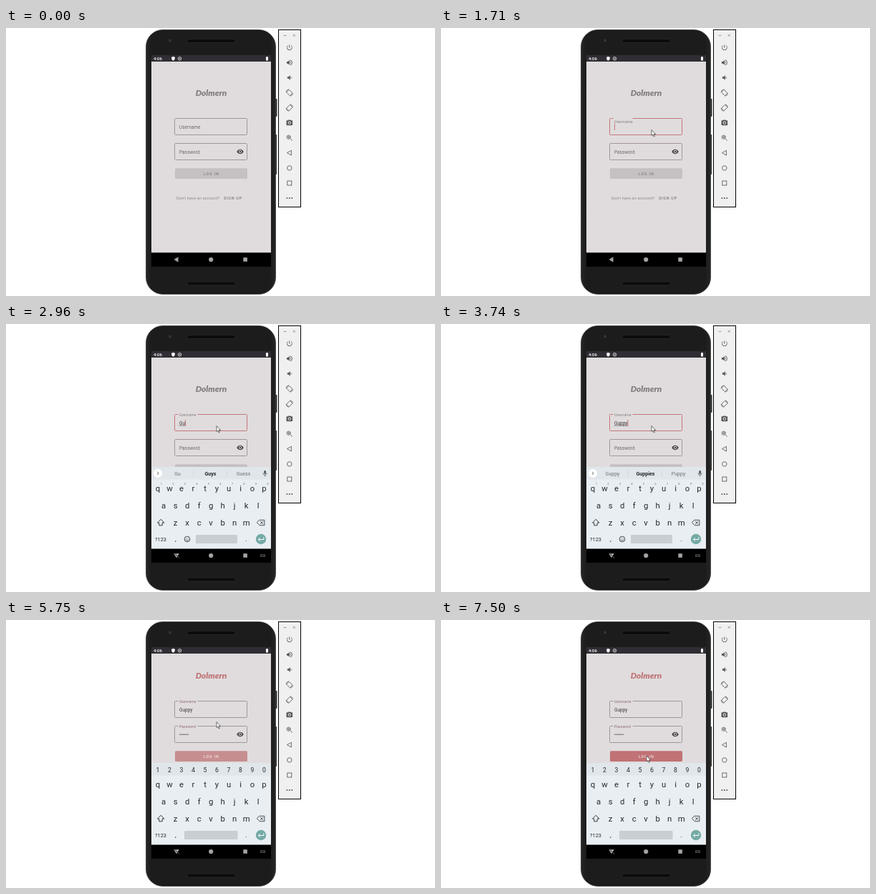
An HTML page that plays this animation: 599x375 px, repeating every 8 s.

```html
<!DOCTYPE html>
<html lang="en">
<head>
<meta charset="utf-8">
<title>Login screen</title>
<style>
html, body { margin: 0; width: 100%; height: 100%; overflow: hidden; background: #fff; }
svg { display: block; width: 100vw; height: 100vh; }
text { font-family: Roboto, sans-serif; white-space: pre; }
</style>
</head>
<body>
<svg id="stage" viewBox="0 0 599 375">
  <defs>
    <linearGradient id="body" x2="1" y2="0">
      <stop offset="0" stop-color="#262626"/><stop offset=".04" stop-color="#1c1c1c"/>
      <stop offset=".96" stop-color="#1c1c1c"/><stop offset="1" stop-color="#262626"/>
    </linearGradient>
  </defs>
</svg>
<script>
const NS = 'http://www.w3.org/2000/svg', LOOP = 8000;
const INK = '#1f2b2e', SOFT = '#566064', PINK = '#c4777b', GREY = '#857d80', BG = '#e0dcdd';
const stage = document.getElementById('stage');

function el(parent, tag, attrs, text) {
  const e = document.createElementNS(NS, tag);
  set(e, attrs);
  if (text !== undefined) e.textContent = text;
  return parent.appendChild(e);
}
function set(e, attrs) {
  for (const k in attrs) e.setAttribute(k, attrs[k]);
}
const clamp = (v, a, b) => Math.min(b, Math.max(a, v));
const show = (e, on) => e.setAttribute('display', on ? 'inline' : 'none');
const group = (p, attrs = {}) => el(p, 'g', attrs);
const rect = (p, x, y, width, height, fill, more = {}) =>
  el(p, 'rect', { x, y, width, height, fill, ...more });
const circle = (p, cx, cy, r, fill, more = {}) => el(p, 'circle', { cx, cy, r, fill, ...more });
const path = (p, d, fill, more = {}) => el(p, 'path', { d, fill, ...more });
const line = (p, d, color, w = 1) =>
  path(p, d, 'none', { stroke: color, 'stroke-width': w, 'stroke-linecap': 'round', 'stroke-linejoin': 'round' });
const label = (p, x, y, size, fill, text, more = {}) =>
  el(p, 'text', { x, y, 'font-size': size, fill, ...more }, text);
const mid = (p, x, y, size, fill, text, more = {}) =>
  label(p, x, y, size, fill, text, { 'text-anchor': 'middle', ...more });
// 24-unit icon grid centred on x, y
const icon = (p, x, y, s = .43) =>
  group(p, { transform: `translate(${x} ${y}) scale(${s}) translate(-12 -12)` });

// Phone shell
rect(stage, 376, 99, 2.5, 25, '#333', { rx: .8 });
rect(stage, 376, 149, 2, 56, '#333', { rx: .8 });
rect(stage, 195.5, 2.5, 181, 370, 'url(#body)', { rx: 23.5, stroke: '#3c3c3c', 'stroke-width': .8 });
circle(stage, 229, 17.5, 2, '#343434');
for (const y of [15.5, 355]) rect(stage, 253, y, 67, 5, '#0b0b0b', { rx: 2.5, stroke: '#303030', 'stroke-width': .6 });
rect(stage, 203, 38, 167, 296, BG);

// Login form
const form = group(stage);
const logo = mid(form, 286.5, 95, 11.8, GREY, 'Dolmern',
  { 'font-weight': 900, 'font-style': 'italic', style: 'font-family: Lato, sans-serif' });

function field(y, name) {
  const box = line(form, '', GREY);
  const tag = label(form, 242, 0, 6.3, GREY, name, { 'letter-spacing': .1 });
  const value = label(form, 242, y + 14.3, 6.5, '#3b3638', '');
  const under = line(form, '', '#3b3638', .6);
  const caret = rect(form, 0, y + 7.5, 1, 9, PINK);
  return s => {
    const f = s.float, from = f > .5 ? 268 : 240;
    set(box, {
      d: `M${from} ${y}H335.5q1 0 1 1v21q0 1-1 1h-99q-1 0-1-1v-21q0-1 1-1H240`,
      stroke: s.focus ? PINK : '#9d9799'
    });
    set(tag, { y: y + 14.3 - 12.2 * f, 'font-size': 6.3 - 1.3 * f, fill: s.color });
    value.textContent = s.text;
    const w = s.text ? value.getComputedTextLength() : 0;
    set(under, { d: `M242 ${y + 15.6}h${w}` });
    show(under, s.composing);
    caret.setAttribute('x', 242 + w);
    show(caret, s.focus);
  };
}
const userField = field(126.5, 'Username');
const passField = field(161.5, 'Password');
path(icon(form, 327, 173), 'M12 4.5C7 4.5 2.7 7.6 1 12c1.7 4.4 6 7.5 11 7.5s9.3-3.1 11-7.5c-1.7-4.4-6-7.5-11-7.5zm0 12.5a5 5 0 1 1 0-10 5 5 0 0 1 0 10zm0-8a3 3 0 1 0 0 6 3 3 0 0 0 0-6z', '#4a4648');
const button = rect(form, 236, 196.2, 101, 14.8, '#c5c0c1', { rx: 1.5 });
const buttonText = mid(form, 286.8, 205.6, 5.3, GREY, 'LOG IN', { 'font-weight': 500, 'letter-spacing': .8 });
label(form, 238, 239.6, 5.7, '#8c8688', "Don't have an account?", { 'letter-spacing': .1 });
label(form, 304, 239.6, 5.4, '#7d777a', 'SIGN UP', { 'font-weight': 500, 'letter-spacing': .75 });

// Status bar
rect(stage, 203, 38, 167, 9, '#302e34');
label(stage, 206, 45, 6, '#fff', '4:06', { 'font-weight': 500 });
path(stage, 'M233.5 40l2.3 .8v2q0 2-2.3 3-2.3-1-2.3-3v-2z', '#fff');
circle(stage, 242.5, 42.8, 2.2, 'none', { stroke: '#e8e8e8', 'stroke-width': .9 });
circle(stage, 242.5, 42.8, .8, '#e8e8e8');
path(stage, 'M363.8 40h1.4v.6h.8v5h-3v-5h.8z', '#fff');

// Navigation bar
rect(stage, 203, 314.3, 167, 19.7, '#000');

// Keyboard
const board = group(stage);
rect(board, 203, 200, 167, 114.3, '#e9eef2');
rect(board, 203, 200, 167, 17.5, '#e1e6eb');
const STEP = 16.5;
function keys(chars, x, y) {
  [...chars].forEach((c, i) => mid(board, x + i * STEP, y, 11.3, INK, c));
}
keys('qwertyuiop', 212, 233.8);
keys('asdfghjkl', 220.2, 257.6);
keys('zxcvbnm', 236.6, 281.6);
const hints = group(board);
const digits = group(board);
[...'1234567890'].forEach((c, i) => {
  mid(hints, 217 + i * STEP, 225.2, 4.2, '#6b7376', c);
  mid(digits, 212 + i * STEP, 213, 8.6, INK, c);
});
line(board, 'M216 273.5l-4.5 4.7h2.3v3.6h4.4v-3.6h2.3z', INK, .9);
line(board, 'M354 274.3h6.8v7.4H354l-3.4-3.7zM355.5 276.4l3.2 3.2m0-3.2l-3.2 3.2', INK, .8);
mid(board, 216, 304, 7.3, INK, '?123');
mid(board, 237, 304, 9, INK, ',');
mid(board, 335.5, 304, 9, INK, '.');
const smile = group(board);
circle(smile, 253, 301, 3.9, 'none', { stroke: INK, 'stroke-width': .8 });
line(smile, 'M250.9 302q2.1 2.5 4.2 0M251.6 299.7v.1M254.4 299.7v.1', INK, .8);
const space = rect(board, 265, 295, 58, 12, '#c9ced2', { rx: 1 });
circle(board, 356, 301, 7.2, '#74aaa6');
const enter = line(board, '', '#fff');

// Strip above the letters
const strip = group(board);
circle(strip, 212, 209, 6, '#fff');
const chevron = line(strip, '', '#4a5356', .9);
rect(strip, 360.3, 205, 2.6, 5, '#4a5356', { rx: 1.3 });
line(strip, 'M359 208.8q0 2.7 2.6 2.7t2.6-2.7M361.6 211.5v1.5', '#4a5356', .7);

const tools = group(board);
circle(tools, 234, 208, 2.6, 'none', { stroke: SOFT, 'stroke-width': .8 });
line(tools, 'M236 210l2.2 2.2', SOFT, .9);
line(tools, 'M255.7 205.5h6.6v4.8l-2.2 2.2h-4.4zM257.4 209.3q1.6 1.8 3.2 0M257.6 207.6v.1M260.4 207.6v.1', SOFT, .7);
mid(tools, 283, 211.4, 6.4, SOFT, 'GIF', { 'font-weight': 700 });
rect(tools, 304.5, 205, 5.2, 5.8, 'none', { stroke: SOFT, 'stroke-width': .7, rx: .6 });
rect(tools, 307.2, 207.5, 5, 5.5, '#e1e6eb', { stroke: SOFT, 'stroke-width': .7, rx: .6 });
line(tools, 'M308.5 209.5h2.4M309.7 209v.5q0 1.5-1.2 2M309 210.3l1.8 1.4', SOFT, .5);
for (const x of [335, 338, 341]) circle(tools, x, 209, .8, SOFT);
line(tools, 'M322 205v8.5', '#ccd2d6', .7);

const words = group(board);
const guesses = [239.5, 285.5, 331.5].map((x, i) =>
  mid(words, x, 211.8, 7, i === 1 ? '#1f2628' : '#6b7376', '', { 'font-weight': i === 1 ? 700 : 400 }));
line(words, 'M261.5 205v8.5M308.5 205v8.5', '#ccd2d6', .7);

// Navigation icons stay above the keyboard
const NAV = '#a3a3a3';
const back = path(stage, 'M234.5 324l6-3.7v7.4z', NAV);
const down = group(stage);
path(down, 'M234.3 321.3h7.4l-3.7 6z', '#b5b5b5');
line(down, 'M235.5 320.5l6 7', '#000', 1.1);
line(down, 'M236.3 320.8l5.4 6.6', '#b5b5b5', .6);
rect(down, 355, 321.9, 7, 4.2, '#484848', { rx: .6 });
line(down, 'M356.3 323.3h4.5M357 324.9h3', '#000', .6);
circle(stage, 286.2, 324, 3.1, NAV);
rect(stage, 331.3, 321.2, 5.6, 5.6, NAV);

// Emulator side panel
rect(stage, 380.5, 2.5, 31, 248, '#f0f0f0', { stroke: '#000' });
line(stage, 'M388 10.5h3', '#777', .7);
line(stage, 'M401 9l2.6 2.6m0-2.6l-2.6 2.6', '#777', .7);
const TOOL = '#585858';
const side = i => icon(stage, 395.8, 27.3 + i * 21.08);
path(side(0), 'M13 3h-2v10h2zM17.8 5.2l-1.4 1.4A7 7 0 1 1 7.6 6.6L6.2 5.2a9 9 0 1 0 11.6 0z', TOOL);
path(side(1), 'M3 9v6h4l5 5V4L7 9zM16.5 12A4.5 4.5 0 0 0 14 8v8a4.5 4.5 0 0 0 2.5-4zM14 3.2v2a7 7 0 0 1 0 13.6v2a9 9 0 0 0 0-17.6z', TOOL);
path(side(2), 'M5 9v6h4l5 5V4L9 9zM18.5 12A4.5 4.5 0 0 0 16 8v8a4.5 4.5 0 0 0 2.5-4z', TOOL);
for (const [i, flip] of [[3, 1], [4, -1]]) {
  const g = group(side(i), { transform: `translate(12 12) scale(${flip} 1)` });
  rect(g, -6, -8, 12, 16, 'none', { rx: 1, stroke: TOOL, 'stroke-width': 2, transform: 'rotate(-45)' });
  line(g, 'M-11 -3A11 11 0 0 1 -3 -11M11 3A11 11 0 0 1 3 11', TOOL, 1.8);
}
path(side(5), 'M9 2 7 4H4a2 2 0 0 0-2 2v12a2 2 0 0 0 2 2h16a2 2 0 0 0 2-2V6a2 2 0 0 0-2-2h-3l-2-2zm3 15a5 5 0 1 1 0-10 5 5 0 0 1 0 10zm0-8a3 3 0 1 0 0 6 3 3 0 0 0 0-6z', TOOL);
line(side(6), 'M15.5 9.5a6 6 0 1 0-12 0 6 6 0 0 0 12 0M14 14l6.5 6.5M9.5 7v5M7 9.5h5', TOOL, 2);
line(side(7), 'M18 4.5v15L5 12z', TOOL, 2);
circle(side(8), 12, 12, 7.5, 'none', { stroke: TOOL, 'stroke-width': 2 });
rect(side(9), 5, 5, 14, 14, 'none', { stroke: TOOL, 'stroke-width': 2 });
const dots = side(10);
for (const x of [4, 12, 20]) circle(dots, x, 12, 2.3, TOOL);

const cursor = path(stage, 'M0 0V8L1.8 6.4 3.2 9.4 4.4 8.9 3.1 5.9H5.6z', '#fff',
  { stroke: '#333', 'stroke-width': .7, 'stroke-linejoin': 'round' });

const TICKS = [0, 460, 710, 960, 1210, 1460, 1710, 1960, 2200, 2450, 2960, 3240, 3490, 3740, 3990,
  4240, 4490, 4740, 4990, 5240, 5500, 5750, 6000, 6250, 6500, 6750, 7000, 7250, 7500];
const NAME = 'Guppy';
const HINTS = {
  2: ['Gu', 'Guys', 'Guess'], 3: ['Gup', 'Guppy', 'Gulp'],
  4: ['Gupp', 'Guppy', 'Guppies'], 5: ['Guppy', 'Guppies', 'Puppy']
};
const PRESS = { 21: '#c78e90', 26: '#c98688', 27: '#c57d80' };

function pointer(k) {
  if (k < 6) {
    const u = (5 - clamp(k, 1, 5)) / 4;
    return [294 + 159 * u ** 2.2, 142.6 + 130 * u ** 2.4];
  }
  const u = clamp((k - 21) / 4, 0, 1), e = u * u * (3 - 2 * u);
  return [294 - 7 * e, 142.6 + 47.4 * e];
}

function draw(t) {
  let k = TICKS.length - 1;
  while (TICKS[k] > t) k--;

  const typed = k < 10 ? 0 : clamp(k - 8, 0, 5);
  const secret = k < 15 ? 0 : clamp(k - 13, 0, 6);
  const numeric = k >= 14, lifted = k >= 21, ready = k >= 15, open = k >= 8;
  const tint = lifted ? '#8d6a72' : GREY, idle = '#6a6466';

  form.setAttribute('transform', `translate(0 ${lifted ? -13 : 0})`);
  logo.setAttribute('fill', lifted ? '#c07678' : GREY);
  userField({
    float: k < 6 ? 0 : k === 6 ? .6 : 1, focus: k >= 6 && k < 14, color: k < 6 ? idle : tint,
    text: NAME.slice(0, typed), composing: typed > 0 && k < 14
  });
  const last = secret && k < 20 ? secret : '';
  passField({
    float: k < 14 ? 0 : k === 14 ? .6 : 1, focus: k >= 14 && k < 21,
    color: k < 14 ? idle : lifted ? tint : '#b0777c',
    text: '•'.repeat(last ? secret - 1 : secret) + last, composing: false
  });
  button.setAttribute('fill', ready ? PRESS[k] || '#c17275' : '#c5c0c1');
  buttonText.setAttribute('fill', ready ? '#f3e4e4' : GREY);

  show(board, open);
  show(down, open);
  show(back, !open);
  const rising = k === 8;
  set(board, { transform: `translate(0 ${rising ? 6 : 0})`, opacity: rising ? .84 : 1 });
  const suggest = typed > 0 && !numeric;
  show(tools, !typed);
  show(words, suggest);
  for (const part of [strip, hints, smile]) show(part, !numeric);
  show(digits, numeric);
  set(space, { x: numeric ? 249 : 265, width: numeric ? 74.5 : 58 });
  set(chevron, { d: typed ? 'M211.2 207l2 2-2 2' : 'M212.8 207l-2 2 2 2' });
  set(enter, {
    d: numeric && k < 20 ? 'M351.8 301h6M355.8 298.8l2.2 2.2-2.2 2.2M360 298.6v4.8'
      : 'M359.8 298.8v2.7h-7M354.5 299.5l-2 2 2 2'
  });
  if (suggest) HINTS[typed].forEach((w, i) => { guesses[i].textContent = w; });

  const [x, y] = pointer(k);
  show(cursor, k > 0);
  cursor.setAttribute('transform', `translate(${x.toFixed(1)} ${y.toFixed(1)})`);
}

const start = performance.now();
function tick() {
  draw((performance.now() - start) % LOOP);
  requestAnimationFrame(tick);
}
tick();
</script>
</body>
</html>
```
